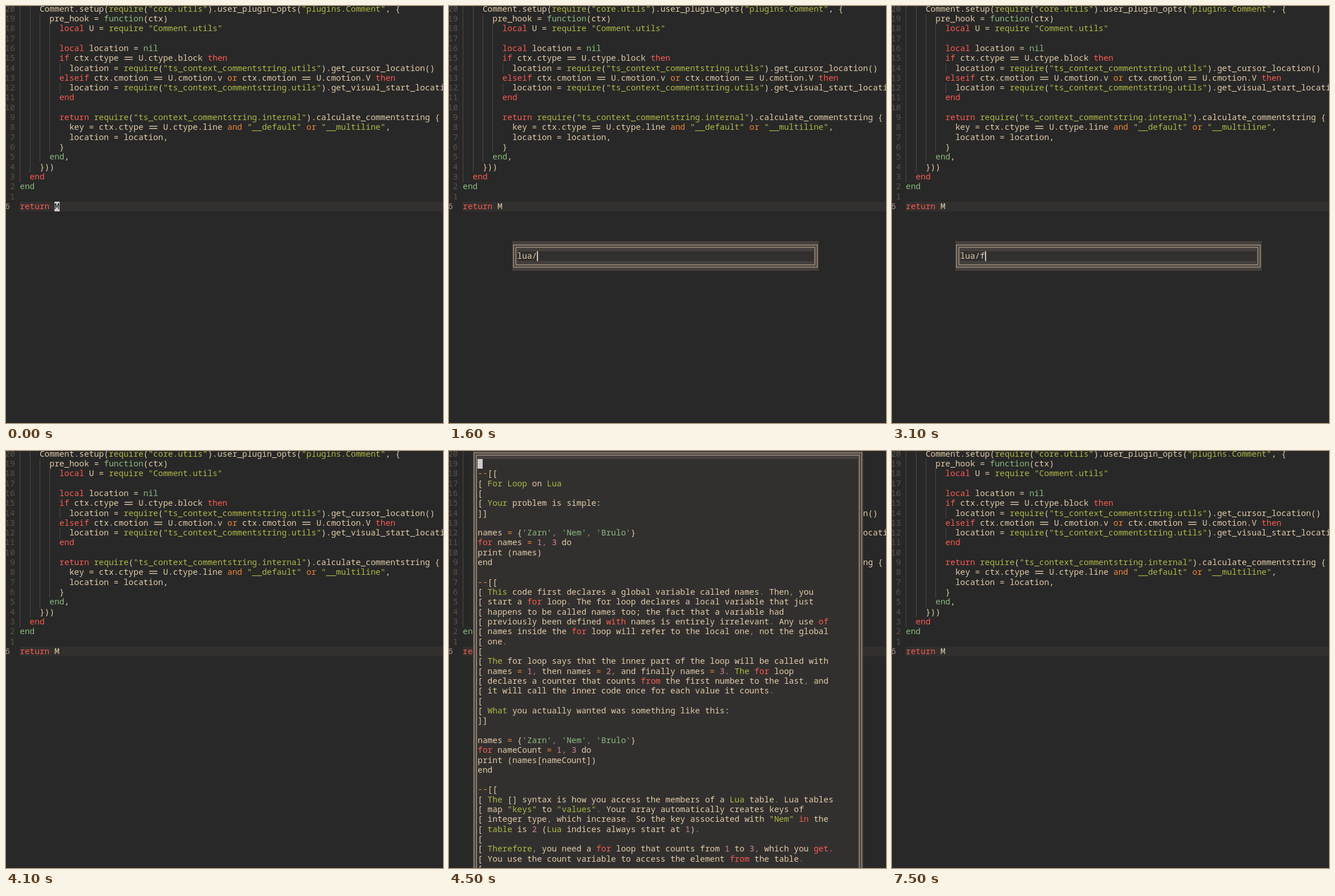
Recreate the animation shown at these times as an HTML page with a canvas. Size 766x731 px, loop 8000 ms.

```html
<!DOCTYPE html>
<html lang="en">
<head>
<meta charset="utf-8">
<title>Editor popup</title>
<style>
html, body { margin: 0; width: 100%; height: 100%; overflow: hidden; background: #282828; }
canvas { display: block; }
</style>
</head>
<body>
<canvas id="stage" width="766" height="731"></canvas>
<script>
const ctx = document.getElementById('stage').getContext('2d');

// Terminal grid
const CELL_W = 8.66, CELL_H = 17.32;
const colX = c => 24.3 + c * CELL_W;
const rowY = r => -3.3 + r * CELL_H;

const COLORS = {
  bg: '#282828', panel: '#32302f', edge: '#45403d', line: '#a08f7d',
  guide: '#504945', number: '#5a524c', current: '#a89984', cursor: '#cccccc',
  w: '#e2cca9', r: '#fb5b51', o: '#f28534', g: '#b0b846',
  a: '#8bba7f', p: '#d3869b', d: '#928374'
};

// Later rules win; "~" plus a colour letter marks a single word
const CODE_RULES = [
  ['r', /\b(local|if|then|elseif|return|end)\b/g],
  ['a', /\b(function|nil)\b|^end$|end(?=,)/g],
  ['o', /\b(and|or)\b/g],
  ['g', /\brequire\b|"[^"]*"/g]
];
const NOTE_RULES = [
  ['d', /[.,]/g],
  ['o', /=|--/g],
  ['p', /\d\.?/g],
  ['g', /"[^"]*"/g],
  ['a', /'[^']*'/g]
];

const CODE = `    Comment.setup(require("core.utils").user_plugin_opts("plugins.Comment", {
      pre_hook = function(ctx)
        local U = require "Comment.utils"

        local location = nil
        if ctx.ctype == U.ctype.block then
          location = require("ts_context_commentstring.utils").get_cursor_location()
        elseif ctx.cmotion == U.cmotion.v or ctx.cmotion == U.cmotion.V then
          location = require("ts_context_commentstring.utils").get_visual_start_location()
        end

        return require("ts_context_commentstring.internal").calculate_commentstring {
          key = ctx.ctype == U.ctype.line and "__default" or "__multiline",
          location = location,
        }
      end,
    }))
  end
end

return M`.split('\n');

const NOTE = `
--[[
[ ~gFor ~gLoop on ~gLua
[
[ ~gYour problem is simple:
]]

names = {'Zarn', 'Nem', 'Brulo'}
~rfor names = 1, 3 do
print (names)
end

--[[
[ ~gThis code first declares a global variable called names. Then, you
[ start a ~rfor loop. The for loop declares a local variable that just
[ happens to be called names too; the fact that a variable had
[ previously been defined ~rwith names is entirely irrelevant. Any use ~rof
[ names inside the ~rfor loop will refer to the local one, not the global
[ one.
[
[ ~gThe for loop says that the inner part of the loop will be called with
[ names = 1, then names = 2, and finally names = 3. ~gThe ~rfor loop
[ declares a counter that counts ~rfrom the first number to the last, and
[ it will call the inner code once for each value it counts.
[
[ ~gWhat you actually wanted was something like this:
]]

names = {'Zarn', 'Nem', 'Brulo'}
~rfor nameCount = 1, 3 do
print (names[nameCount])
end

--[[
[ ~gThe [] syntax is how you access the members of a ~gLua table. Lua tables
[ map "keys" to "values". Your array automatically creates keys of
[ integer type, which increase. So the key associated with "Nem" ~rin the
[ ~gtable is 2 (~gLua indices always start at 1).
[
[ ~gTherefore, you need a ~rfor loop that counts from 1 to 3, which you ~rget.
[ You use the count variable to access the element ~rfrom the table.
[`.split('\n');

// Columns of indent guides with their first and last rows
const GUIDES = [[0, 0, 17], [2, 0, 16], [4, 1, 15], [6, 2, 14], [8, 6, 6], [8, 8, 8]];

function fillCells(col, row, cols, rows, color) {
  const x = Math.round(colX(col)), y = Math.round(rowY(row));
  ctx.fillStyle = color;
  ctx.fillRect(x, y, Math.round(colX(col + cols)) - x, Math.round(rowY(row + rows)) - y);
}

function glyphs(text, col, row, colorAt) {
  const base = Math.round(rowY(row) + 12.9);
  for (let i = 0; i < text.length; i++) {
    ctx.fillStyle = colorAt(i);
    const x = colX(col + i);
    if (text.startsWith('==', i)) {
      // Double equals is one wide sign
      for (const dy of [-7, -3]) ctx.fillRect(x + 1.5, base + dy, 2 * CELL_W - 3, 1.4);
      i++;
    } else if (text[i] !== ' ') {
      ctx.fillText(text[i], x, base);
    }
  }
}

function highlighted(source, col, row, rules) {
  const marks = [];
  const text = source.replace(/~(.)(\w+\.?)/g, (all, key, word, at) => {
    marks.push([at - 2 * marks.length, word.length, key]);
    return word;
  });
  const keys = Array(text.length).fill('w');
  for (const [key, pattern] of rules)
    for (const m of text.matchAll(pattern)) keys.fill(key, m.index, m.index + m[0].length);
  for (const [at, size, key] of marks) keys.fill(key, at, at + size);
  glyphs(text, col, row, i => COLORS[keys[i]]);
}

function plain(text, col, row, color) {
  glyphs(text, col, row, () => color);
}

function floatBox(col, row, cols, rows) {
  fillCells(col, row, cols, rows, COLORS.edge);
  fillCells(col + 1, row + 1, cols - 2, rows - 2, COLORS.panel);
  ctx.strokeStyle = COLORS.line;
  ctx.lineWidth = 1.5;
  for (const d of [-2, 2]) {
    const x = colX(col + 0.5) + d, y = rowY(row + 0.5) + d;
    ctx.strokeRect(x, y, (cols - 1) * CELL_W - 2 * d, (rows - 1) * CELL_H - 2 * d);
  }
}

function editor(showCursor) {
  ctx.fillStyle = COLORS.bg;
  ctx.fillRect(0, 0, 766, 731);
  fillCells(0, 20, 90, 1, COLORS.panel);
  for (const [col, first, last] of GUIDES) {
    const y = rowY(first);
    ctx.fillStyle = COLORS.guide;
    ctx.fillRect(Math.round(colX(col)), y, 1, rowY(last + 1) - y);
  }
  CODE.forEach((line, row) => {
    if (row < 20) plain(String(20 - row).padStart(2), -3, row, COLORS.number);
    highlighted(line, 0, row, CODE_RULES);
  });
  plain('6', -3, 20, COLORS.current);
  if (showCursor) {
    fillCells(7, 20, 1, 1, COLORS.cursor);
    plain('M', 7, 20, '#111111');
  }
}

function prompt(text) {
  floatBox(10, 24, 62, 3);
  plain(text, 11, 25, COLORS.w);
  ctx.fillStyle = COLORS.cursor;
  ctx.fillRect(Math.round(colX(11 + text.length)), 430, 2, 17);
}

function notePopup() {
  floatBox(2, 0, 79, 48);
  fillCells(3, 1, 1, 1, COLORS.cursor);
  NOTE.forEach((line, i) => highlighted(line, 3, i + 1, NOTE_RULES));
}

// Start time in ms and what is on screen from then on
const SCENES = [
  [0, () => editor(true)],
  [300, () => editor(false)],
  ...[[1600, 'lua/'], [3100, 'lua/f'], [3300, 'lua/fo'], [3400, 'lua/for']]
    .map(([start, text]) => [start, () => { editor(false); prompt(text); }]),
  [4100, () => editor(false)],
  [4500, () => { editor(false); notePopup(); }],
  [6700, () => editor(true)],
  [7500, () => editor(false)]
];

ctx.font = '500 14.43px "Noto Sans Mono", "DejaVu Sans Mono", monospace';
const begin = performance.now();
let shown;

function tick() {
  const time = (performance.now() - begin) % 8000;
  const scene = SCENES.findLast(([start]) => start <= time);
  if (scene !== shown) {
    shown = scene;
    scene[1]();
  }
  requestAnimationFrame(tick);
}
tick();
</script>
</body>
</html>
```
